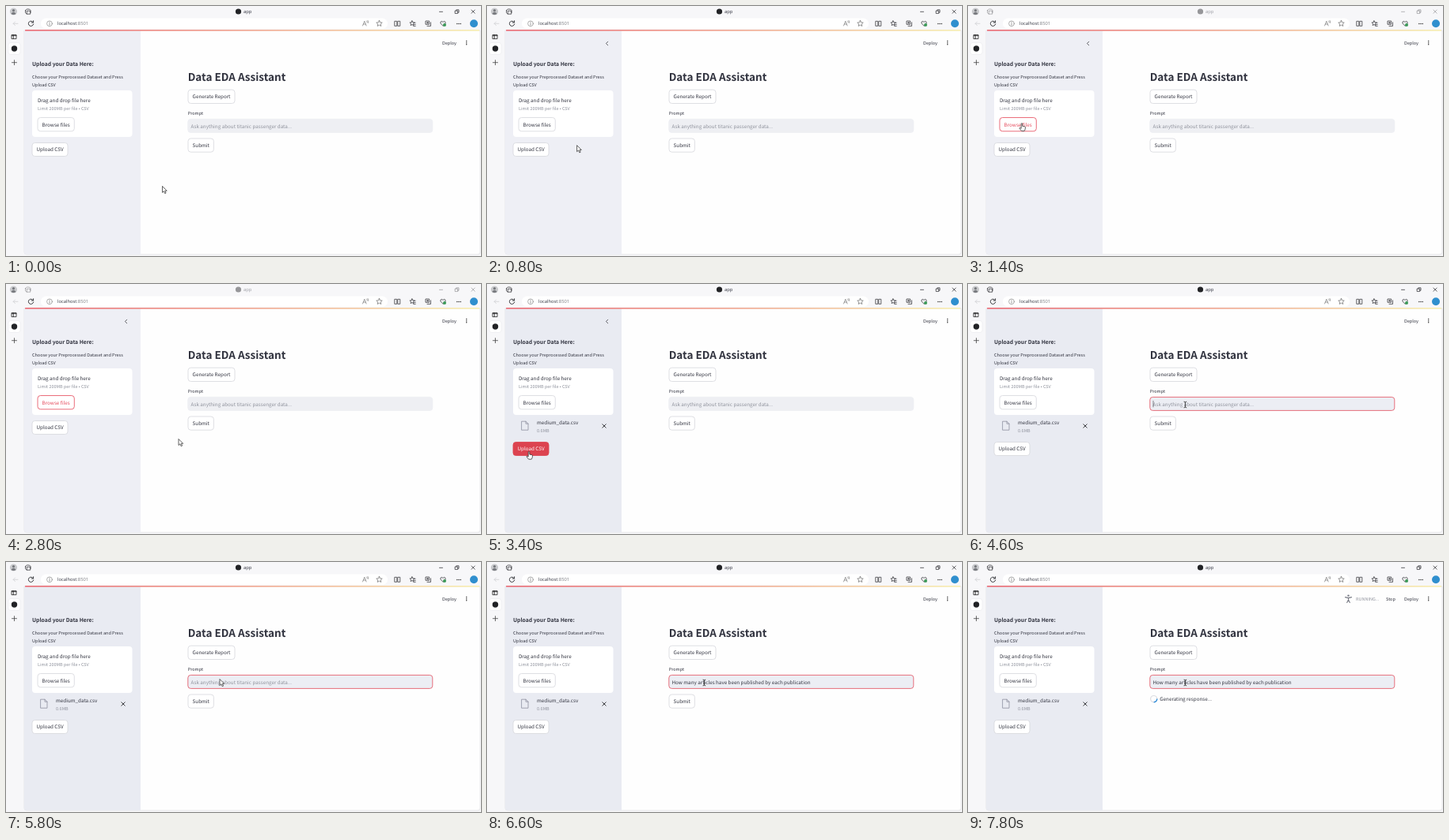
An HTML page for the animation above (8 s loop, 600 px wide and 317 px high).

```html
<!DOCTYPE html>
<html lang="en">
<head>
<meta charset="utf-8">
<title>app</title>
<style>
html, body { margin: 0; width: 100%; height: 100%; overflow: hidden; background: #f7f7f9; }
svg { display: block; width: 100%; height: 100%; }
text { font-family: "Noto Sans CJK JP", "Noto Sans CJK SC", "Noto Sans", sans-serif; font-size: 6.29px; fill: #31333f; text-rendering: geometricPrecision; white-space: pre; }
.small { font-size: 5.5px; }
.head { font-size: 6.8px; font-weight: 700; }
.title { font-size: 13.5px; font-weight: 700; }
.muted { fill: #8f929c; }
.ui { font-family: "Open Sans", "Noto Sans", sans-serif; font-size: 5.8px; }
.line { fill: none; stroke: #3b3c40; stroke-width: .8; stroke-linecap: round; stroke-linejoin: round; }
.btn rect { fill: #fff; stroke: #d6d7dc; stroke-width: .8; }
.btn.hover rect { stroke: #e5485a; }
.btn.hover text { fill: #e5485a; }
.btn.press rect { fill: #dc4350; stroke: #dc4350; }
.btn.press text { fill: #fff; }
</style>
</head>
<body>
<svg id="stage" viewBox="0 0 600 317" xmlns="http://www.w3.org/2000/svg"></svg>
<script>
const stage = document.getElementById('stage');

const text = (x, y, str, cls = '', id = '') =>
  `<text x="${x}" y="${y}" class="${cls}"${id && ` id="${id}"`}>${str}</text>`;
const line = (d, attrs = '') => `<path class="line" d="${d}" ${attrs}/>`;
const box = (x, y, w, h, r, fill, attrs = '') =>
  `<rect x="${x}" y="${y}" width="${w}" height="${h}" rx="${r}" fill="${fill}" ${attrs}/>`;
const dot = (x, y, r, fill) => `<circle cx="${x}" cy="${y}" r="${r}" fill="${fill}"/>`;
const button = (id, x, y, w, h, label) =>
  `<g id="${id}" class="btn">${box(x, y, w, h, 3.5, '#fff')}${text(x + 5.6, y + h / 2 + 2.4, label)}</g>`;
const menuDots = (x, y, dx, dy) => [-1, 0, 1].map(i => dot(x + i * dx, y + i * dy, .75, '#333')).join('');

const titleBar = `<g id="titlebar">
  ${dot(290 + 3.5, 7, 3.6, '#222326')}${text(300, 9, 'app', 'ui')}
  ${line('M547.5 7.3h4M567.5 6h3.2v3.4h-3.2zM568.8 6v-1.2h3.2v3.4h-1.2M588 5l4.2 4.2M592.2 5l-4.2 4.2')}
  ${line('M24.5 5.5l2-1.5h3l1.5 1.5v3M24.5 5.5v3l1.5 1.7M26.7 6.2h4v4h-4z')}
</g>`;

const toolbar = `
  ${dot(9.5, 7, 4.6, '#c9cacd')}${dot(9.5, 5.7, 1.6, '#77797e')}
  <path d="M6.4 9.7q3.1-4 6.2 0q-3.1 2.6-6.2 0z" fill="#77797e"/>
  ${line('M15 22.3H9.2M11.5 20l-2.3 2.3 2.3 2.3', 'style="stroke:#d0d1d4"')}
  ${line('M34.4 20.8a3.2 3.2 0 1 0 .3 2.2M34.6 18.7v2.3h-2.3', 'style="stroke-width:1"')}
  ${box(44, 15.5, 438, 13.5, 6.7, '#fff')}
  <circle class="line" cx="55" cy="22.3" r="3.4" style="stroke:#777;stroke-width:.6"/>
  ${line('M55 22v2M55 20.5v.1', 'style="stroke:#777"')}
  ${text(65, 24.4, 'localhost<tspan fill="#7b7c80">:8501</tspan>', 'ui')}
  ${line('M450.5 25l2.3-5.8 2.3 5.8M451.4 23h2.8M455.6 19q1 .8 .6 2M457 18.3q1.2 1.2.7 3', 'style="stroke:#666;stroke-width:.6"')}
  ${line(star(471.5, 22.3, 3.9), 'style="stroke:#666;stroke-width:.7"')}
  ${line('M491.2 19.3h2.6v6h-2.6zM495.2 19.3h2.6v6h-2.6z')}
  ${line(star(513, 22, 3.2))}${line('M515.2 21.2h2M515.2 23.4h2M514.7 25.4h2.5')}
  ${line('M530.4 19h4.2v4.3h-4.2zM532 25.4h4.5v-4.6M532.5 20.2v2M531.5 21.2h2')}
  ${line('M552 25.2l-3-3q-.8-2.8 1.5-2.8l1.5 1 1.5-1q2.3 0 1.5 2.8z')}${dot(554, 24, 2, '#3a9a57')}
  ${menuDots(572, 22.4, 2.2, 0)}
  ${dot(591, 22.3, 5, '#2f8fce')}`;

const rail = `
  ${line('M7.4 36.6h5.6v5h-5.6zM9.3 36.6v5M7.4 37.6h5.6', 'style="stroke:#222"')}
  ${box(3, 46.5, 15, 15, 3, '#fff', 'stroke="#e4e4e8" stroke-width=".5"')}
  ${dot(10.5, 54, 3.7, '#222326')}
  ${line('M7.5 71.7h6M10.5 68.7v6', 'style="stroke:#444"')}`;

const sidebar = `
  <path id="side" d="M23 31h147v284H26q-3 0-3-3z"/>
  <g id="chevron">${line('M152.7 45.2l-2.3 2.3 2.3 2.3')}</g>
  ${text(33, 75.6, 'Upload your Data Here:', 'head')}
  ${text(33, 92.3, 'Choose your Preprocessed Dataset and Press', 'small')}
  ${text(33, 101.9, 'Upload CSV', 'small')}
  ${box(33, 107, 126.5, 59, 4, '#fff')}
  ${text(40, 121.5, 'Drag and drop file here')}
  ${text(40, 132.2, 'Limit 200MB per file • CSV', 'small muted')}
  ${button('browse', 40, 141.5, 46.3, 17.3, 'Browse files')}
  <g id="file">
    ${line('M44 174.2h5l3 3v8h-8zM49 174.2v3h3', 'style="stroke:#8d90a0"')}
    ${text(63, 178.4, 'medium_data.csv')}${text(63, 187.6, '0.6MB', 'small muted')}
    ${line('M145.8 177.8l4.4 4.4M150.2 177.8l-4.4 4.4', 'style="stroke-width:1"')}
  </g>
  ${button('upload', 33, 173.5, 45, 17, 'Upload CSV')}`;

const main = `
  ${text(551, 48.9, 'Deploy', 'small')}${menuDots(581.7, 46.7, 0, 2.1)}
  <g id="running">
    <path id="runner" class="line" style="stroke:#777a84;stroke-width:1.1"/>${dot(480.5, 42.6, 1.2, '#777a84')}
    ${text(490, 48.7, 'RUNNING...', 'small muted')}${text(528, 48.9, 'Stop', 'small')}
  </g>
  ${text(229.7, 95, 'Data EDA Assistant', 'title')}
  ${button('report', 230, 106.2, 59, 17.3, 'Generate Report')}
  ${text(229.7, 138, 'Prompt', 'small')}
  ${box(229.8, 143.4, 309, 17, 3.5, '#eeeff3', 'id="field" stroke-width=".9"')}
  ${text(233.5, 154.6, '', '', 'entry')}
  ${line('M234 148.3v7.6', 'id="caret" style="stroke-width:.6"')}
  ${button('submit', 230, 168, 32.4, 17.2, 'Submit')}
  <g id="wait">
    <circle cx="234.7" cy="173.6" r="4.1" fill="none" stroke="#dcdde2" stroke-width="1.2"/>
    <path id="arc" d="M234.7 169.5a4.1 4.1 0 0 1 4.1 4.1" fill="none" stroke="#2587d8" stroke-width="1.4"/>
    ${text(242.3, 176, 'Generating response...')}
  </g>`;

const pointers = {
  arrow: '<path d="M0 0v8l1.9-1.7 1.3 2.9 1.4-.6-1.3-2.8h2.4z" fill="#fff" stroke="#222" stroke-width=".7"/>',
  hand: '<path d="M-.8.6q.8-1.2 1.6 0v3.2l3 .6q.8.3.7 1.2l-.5 2.8-.8 1.5h-3.6l-2.6-3.2q0-1.1 1-.7l1.2.8z" fill="#fff" stroke="#222" stroke-width=".7"/>',
  beam: '<path class="line" d="M-1.4-3.8q1.4 0 1.4.8v6q0 .8-1.4.8M1.4-3.8Q0-3.8 0-3M1.4 3.8Q0 3.8 0 3" style="stroke:#222"/>'
};

stage.innerHTML = `
  <defs><linearGradient id="stripe"><stop stop-color="#e9434f"/><stop offset=".45" stop-color="#f28a72"/><stop offset="1" stop-color="#fbf0a0"/></linearGradient></defs>
  ${box(0, 0, 600, 317, 0, '#f7f7f9')}
  ${titleBar}${toolbar}${rail}
  <path d="M23 31h576v281q0 3-3 3H26q-3 0-3-3z" fill="#fefefe" stroke="#dedfe3" stroke-width=".7"/>
  ${sidebar}
  ${box(24, 30.2, 574, 1.2, .5, 'url(#stripe)')}
  ${main}
  <g id="pointer"></g>`;

function star(cx, cy, r) {
  const pts = Array.from({ length: 10 }, (_, i) => {
    const a = i * Math.PI / 5 - Math.PI / 2, k = i % 2 ? r * .48 : r;
    return (cx + k * Math.cos(a)).toFixed(2) + ' ' + (cy + k * Math.sin(a)).toFixed(2);
  });
  return 'M' + pts.join('L') + 'z';
}

const LOOP = 8000, STEP = 200;
// time, x, y
const path = [
  [0, 197.5, 228.5], [200, 197.5, 228.5], [1200, 68, 148.5], [1600, 68, 148.5],
  [2400, 218, 196.5], [2800, 218, 196.5], [3400, 53, 212.3], [3800, 53, 212.3],
  [4400, 274.4, 153], [4800, 274.4, 153], [5200, 296, 198], [5800, 270, 148.5],
  [6200, 274.4, 153], [LOOP, 274.4, 153]
];
const poses = [
  'M476.5 44.6l4 1 4-1M480.5 45.5v2.6M478.7 51.4l1.8-3.5 1.8 3.5',
  'M477.3 47.6l3.2-2.3 3.2 1.6M480.5 45.5v2.6M477.4 50.4l3.1-2.3 2.6 3',
  'M477 46l3.5-.5 2.6-2.2M480.5 45.5v2.6M478.2 51.4l2.3-3.3 3 1.4'
];

function pointerAt(t) {
  const i = path.findIndex(p => p[0] > t);
  const [t0, x0, y0] = path[i - 1], [t1, x1, y1] = path[i];
  const u = (t - t0) / (t1 - t0), k = u * u * (3 - 2 * u);
  return [x0 + (x1 - x0) * k, y0 + (y1 - y0) * k];
}

const el = id => document.getElementById(id);
const show = (id, on) => el(id).setAttribute('visibility', on ? 'visible' : 'hidden');

function draw(t) {
  const within = (a, b) => t >= a && t < b;
  const dialog = within(1400, 3000), loaded = t >= 3000;
  const focus = t >= 4400, pasted = t >= 6400, busy = t >= 7000;

  el('titlebar').setAttribute('opacity', dialog ? .45 : 1);
  el('side').setAttribute('fill', loaded ? '#e9ebf2' : '#eeeff5');
  show('chevron', within(600, 4000));
  show('file', loaded);
  el('browse').setAttribute('class', within(1200, 3000) ? 'btn hover' : 'btn');
  el('upload').setAttribute('class', 'btn' + (within(3400, 3600) ? ' press' : within(3600, 4000) ? ' hover' : ''));
  el('upload').setAttribute('transform', `translate(0 ${loaded ? 27 : 0})`);

  el('field').setAttribute('stroke', focus ? '#e5606f' : '#eeeff3');
  el('field').setAttribute('fill', focus ? '#eceef4' : '#eeeff3');
  el('entry').textContent = pasted ? 'How many articles have been published by each publication'
    : 'Ask anything about titanic passenger data...';
  el('entry').setAttribute('class', pasted ? '' : 'muted');
  show('caret', focus && !pasted && (t - 4200) % 1060 < 530);

  show('submit', !busy);
  show('wait', busy);
  show('running', busy || within(3800, 4200));
  el('runner').setAttribute('d', poses[(t / STEP) % 3]);
  el('arc').setAttribute('transform', `rotate(${90 + (t - 7800) * .36} 234.7 173.6)`);

  const [x, y] = pointerAt(t);
  const kind = within(1200, 1800) || within(3400, 4000) ? 'hand'
    : within(4400, 5000) || t >= 6200 ? 'beam' : 'arrow';
  el('pointer').innerHTML = pointers[kind];
  el('pointer').setAttribute('transform', `translate(${x} ${y})`);
}

const start = performance.now();
function tick() {
  const t = (performance.now() - start) % LOOP;
  draw(Math.floor(t / STEP) * STEP);
  requestAnimationFrame(tick);
}
tick();
</script>
</body>
</html>
```
